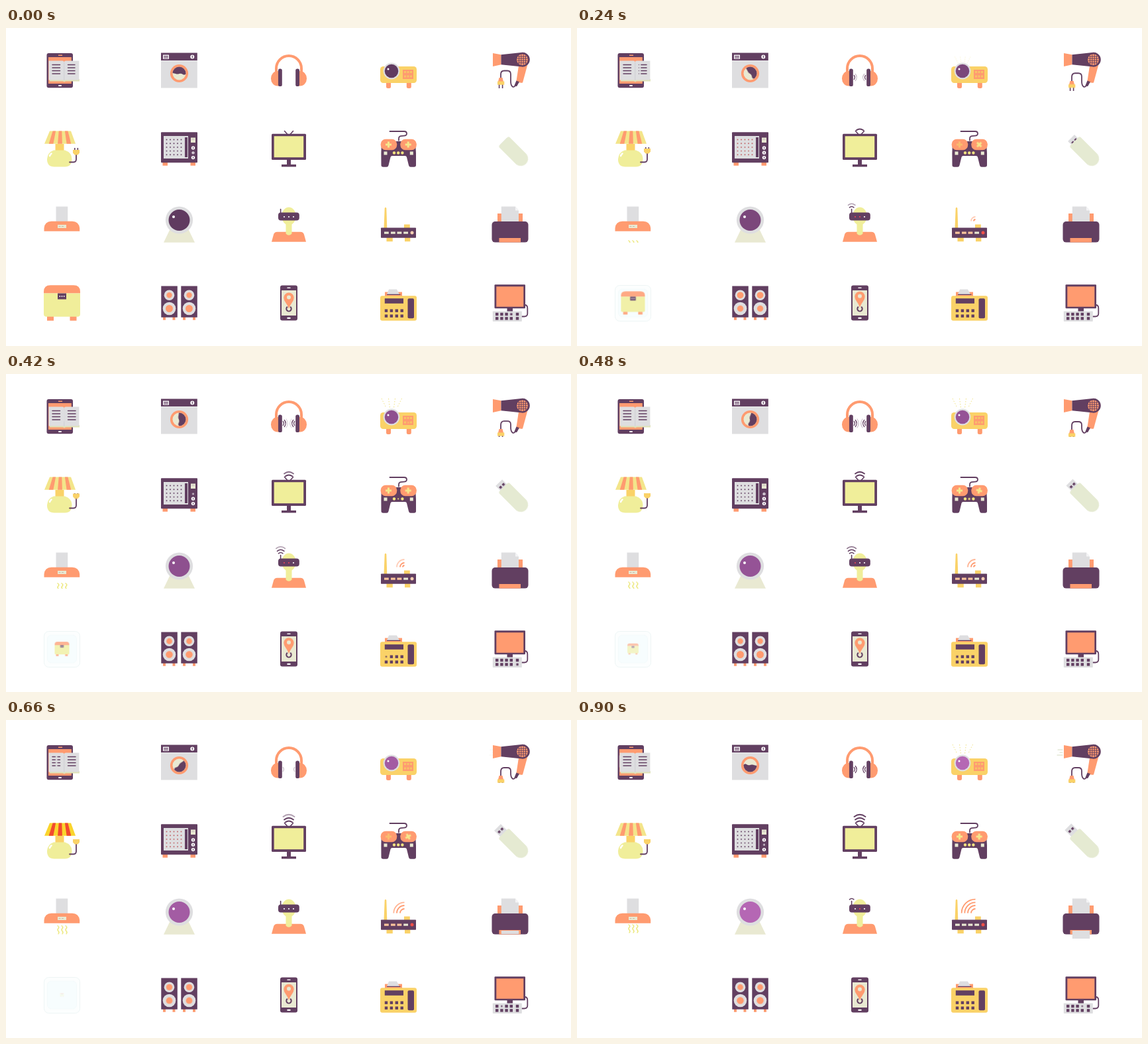
Recreate the animation shown at these times as an HTML page. Size 853x480 px, loop 960 ms.

```html
<!DOCTYPE html>
<html lang="en">
<head>
<meta charset="utf-8">
<title>Household devices</title>
<style>
html, body { margin: 0; width: 100%; height: 100%; overflow: hidden; background: #fff; }
svg { display: block; width: 853px; height: 480px; }

/* palette */
.p { fill: #623f61; } .o { fill: #ff9b70; } .l { fill: #f0ee9a; } .y { fill: #fad268; }
.g { fill: #dedee0; } .b { fill: #e9e9d2; } .w { fill: #fff; }
.line { fill: none; stroke: #623f61; stroke-width: 1.8; stroke-linecap: round; stroke-linejoin: round; }

/* every move advances in ticks of 60 ms, 16 ticks (6.25% each) per loop */
.a { animation: .96s steps(16) infinite; animation-delay: calc(var(--d, 0) * -60ms); }
.mid { transform-box: fill-box; transform-origin: center; }

.page { animation-name: page; }
@keyframes page { to { transform: translateX(-43px); } }

.wash { animation-name: wash; transform-origin: 261.5px 68.5px; }
@keyframes wash { to { transform: rotate(192deg); } }

.ear1 { animation-name: ear1; } .ear2 { animation-name: ear2; } .ear3 { animation-name: ear3; }
@keyframes ear1 {
  0% { opacity: 0; animation-timing-function: steps(3); }
  18.75%, 56.25% { opacity: 1; animation-timing-function: steps(1); }
  62.5% { opacity: 0; animation-timing-function: steps(3); }
  81.25%, 100% { opacity: 1; }
}
@keyframes ear2 {
  0%, 18.75% { opacity: 0; animation-timing-function: steps(3); }
  37.5%, 56.25% { opacity: 1; animation-timing-function: steps(1); }
  62.5%, 81.25% { opacity: 0; animation-timing-function: steps(2); }
  93.75%, 100% { opacity: 1; }
}
@keyframes ear3 {
  0%, 31.25% { opacity: 0; animation-timing-function: steps(4); }
  56.25% { opacity: .9; animation-timing-function: steps(1); }
  62.5%, 100% { opacity: 0; }
}

.lens { animation-name: lens; fill: #603b60; }
@keyframes lens {
  0% { fill: #603b60; animation-timing-function: steps(8); }
  50% { fill: #955396; animation-timing-function: steps(8); }
  100% { fill: #ba6ab8; }
}
.rays { animation-name: rays; transform-origin: 582px 65px; }
@keyframes rays {
  0% { transform: scale(.45); opacity: 0; animation-timing-function: steps(7); }
  43.75%, 56.25% { transform: none; opacity: 1; animation-timing-function: steps(1); }
  62.5% { transform: scale(.45); opacity: 0; animation-timing-function: steps(5); }
  93.75%, 100% { transform: none; opacity: 1; }
}

.cord { animation-name: cord; }
@keyframes cord {
  0% { d: path("M747 76V70Q747 64.500 752 64.500H757Q762 64.500 762 70V80C762 88 766 92 769.500 86"); animation-timing-function: steps(8); }
  50%, 100% { d: path("M747 85V78Q747 72 752 72H757Q762 72 762 77V80C762 88 766 92 769.500 86"); }
}
.plug { animation-name: plug; }
@keyframes plug { 0% { transform: none; animation-timing-function: steps(8); } 50%, 100% { transform: translateY(9px); } }
.air { animation-name: air; }
@keyframes air {
  0%, 62.5% { transform: translateX(6px); opacity: 0; animation-timing-function: steps(5); }
  93.75%, 100% { transform: none; opacity: 1; }
}

.lampcord { animation-name: lampcord; }
@keyframes lampcord {
  0% { d: path("M96 202.500H102Q106 202.500 106 198V190"); animation-timing-function: steps(8); }
  50%, 100% { d: path("M96 202.500H102Q106 202.500 106 198V186"); }
}
.lampplug { animation-name: lampplug; }
@keyframes lampplug { 0% { transform: none; animation-timing-function: steps(8); } 50%, 100% { transform: translateY(-4px); } }
.shade { animation-name: shade; } .stripe { animation-name: stripe; }
@keyframes shade { 0%, 87.5%, 100% { fill: #f3e58a; animation-timing-function: steps(1); } 56.25% { fill: #fad52d; animation-timing-function: steps(1); } }
@keyframes stripe { 0%, 87.5%, 100% { fill: #ff9b70; animation-timing-function: steps(1); } 56.25% { fill: #f24a30; animation-timing-function: steps(1); } }

.heat { animation-name: heat; }
@keyframes heat {
  0%, 37.5%, 93.75%, 100% { stroke: #623f61; animation-timing-function: steps(1); }
  6.25%, 68.75% { stroke: #c06468; animation-timing-function: steps(1); }
}
.press { animation-name: press; }
@keyframes press {
  0% { transform: none; animation-timing-function: steps(2); }
  12.5% { transform: scale(.5); animation-timing-function: steps(2); }
  25%, 100% { transform: none; }
}

.tv1 { animation-name: tv1; } .tv2 { animation-name: tv2; } .tv3 { animation-name: tv3; }
@keyframes tv1 { 0% { opacity: 0; animation-timing-function: steps(4); } 25%, 100% { opacity: 1; } }
@keyframes tv2 { 0%, 25% { opacity: 0; animation-timing-function: steps(4); } 50%, 100% { opacity: 1; } }
@keyframes tv3 { 0%, 50% { opacity: 0; animation-timing-function: steps(6); } 87.5%, 100% { opacity: 1; } }

.dim { animation-name: dim; }
@keyframes dim {
  0%, 37.5%, 75%, 100% { stroke: #f5e88c; animation-timing-function: steps(1); }
  6.25%, 56.25% { stroke: #f9bd6e; animation-timing-function: steps(1); }
}
.spin { animation-name: spin; }
@keyframes spin {
  0% { transform: none; animation-timing-function: steps(4); }
  25% { transform: rotate(45deg); animation-timing-function: steps(3); }
  43.75% { transform: rotate(90deg); animation-timing-function: steps(3); }
  62.5% { transform: rotate(135deg); animation-timing-function: steps(3); }
  81.25%, 100% { transform: rotate(180deg); }
}

.stick { animation-name: stick; }
@keyframes stick {
  0% { transform: translateY(14px); animation-timing-function: steps(4); }
  25% { transform: translateY(7px); animation-timing-function: steps(6); }
  62.5% { transform: translateY(1.5px); animation-timing-function: steps(6); }
  100% { transform: none; }
}

.steam { animation-name: steam; }
@keyframes steam {
  0% { transform: translateY(14px); animation-timing-function: steps(4); }
  25% { transform: translateY(10px); animation-timing-function: steps(6); }
  62.5% { transform: none; animation-timing-function: steps(6); }
  100% { transform: translateY(-2.5px); }
}

.vr1 { animation-name: vr1; } .vr2 { animation-name: vr2; } .vr3 { animation-name: vr3; }
@keyframes vr1 {
  0% { opacity: 0; animation-timing-function: steps(2); }
  12.5%, 62.5% { opacity: 1; animation-timing-function: steps(1); }
  68.75% { opacity: 0; animation-timing-function: steps(4); }
  93.75%, 100% { opacity: 1; }
}
@keyframes vr2 {
  0%, 12.5% { opacity: 0; animation-timing-function: steps(4); }
  37.5%, 62.5% { opacity: 1; animation-timing-function: steps(1); }
  68.75%, 100% { opacity: 0; }
}
@keyframes vr3 {
  0%, 31.25% { opacity: 0; animation-timing-function: steps(4); }
  56.25%, 62.5% { opacity: 1; animation-timing-function: steps(1); }
  68.75%, 100% { opacity: 0; }
}
.led { animation-name: led; fill: #fff; }
@keyframes led {
  0%, 50%, 100% { fill: #fff; animation-timing-function: steps(1); }
  12.5%, 93.75% { fill: #e8465a; animation-timing-function: steps(1); }
}

.net0 { animation-name: net0; } .net1 { animation-name: net1; } .net2 { animation-name: net2; }
.net3 { animation-name: net3; } .net4 { animation-name: net4; }
@keyframes net0 { 0% { opacity: 0; animation-timing-function: steps(2); } 12.5%, 50% { opacity: 1; animation-timing-function: steps(3); } 68.75%, 100% { opacity: 0; } }
@keyframes net1 { 0%, 12.5% { opacity: 0; animation-timing-function: steps(4); } 37.5%, 100% { opacity: 1; } }
@keyframes net2 { 0%, 31.25% { opacity: 0; animation-timing-function: steps(4); } 56.25%, 100% { opacity: 1; } }
@keyframes net3 { 0%, 50% { opacity: 0; animation-timing-function: steps(4); } 75%, 100% { opacity: 1; } }
@keyframes net4 { 0%, 68.75% { opacity: 0; animation-timing-function: steps(4); } 93.75%, 100% { opacity: 1; } }
.power { animation-name: power; }
@keyframes power {
  0%, 37.5%, 75%, 100% { fill: #f8d0b4; animation-timing-function: steps(1); }
  6.25%, 56.25%, 87.5% { fill: #f0504a; animation-timing-function: steps(1); }
}
.port { animation-name: port; }
@keyframes port {
  0%, 75%, 100% { fill: #e9e9d2; animation-timing-function: steps(1); }
  18.75% { fill: #fbc59c; animation-timing-function: steps(1); }
}

.sheet { animation-name: sheet; }
@keyframes sheet { 0%, 50% { transform: translateY(-12.5px); animation-timing-function: steps(7); } 93.75%, 100% { transform: none; } }

.box { animation-name: box; transform-origin: 84.5px 415px; }
@keyframes box {
  0% { transform: none; opacity: 1; animation-timing-function: steps(7); }
  43.75% { transform: scale(.4); opacity: .75; animation-timing-function: steps(3); }
  62.5% { transform: scale(.12); opacity: .2; animation-timing-function: steps(3); }
  81.25% { transform: scale(.08); opacity: .08; animation-timing-function: steps(1); }
  87.5%, 100% { transform: scale(0); opacity: 0; }
}
.halo { animation-name: halo; }
@keyframes halo {
  0% { opacity: 0; animation-timing-function: steps(4); }
  25%, 81.25% { opacity: 1; animation-timing-function: steps(1); }
  87.5%, 100% { opacity: 0; }
}

.beat { animation-name: beat; }
@keyframes beat {
  0%, 50%, 100% { transform: none; animation-timing-function: steps(4); }
  25%, 75% { transform: scale(.86); animation-timing-function: steps(4); }
}
.bob { animation-name: bob; }
@keyframes bob {
  0%, 100% { transform: translateY(1px); animation-timing-function: steps(4); }
  25% { transform: translateY(-.8px); animation-timing-function: steps(6); }
  62.5% { transform: none; animation-timing-function: steps(6); }
}
.key { width: 4.4px; height: 4.4px; }
</style>
</head>
<body>
<svg viewBox="0 0 853 480">
<defs>
  <clipPath id="drum"><circle cx="261.5" cy="68.5" r="10"/></clipPath>
  <clipPath id="socket"><path d="M735 60h30v34.500h-30z"/></clipPath>
  <clipPath id="outlet"><path d="M95 180h20v30H95z"/></clipPath>
  <clipPath id="stove"><path d="M70 306h30v17.500H70z"/></clipPath>
  <clipPath id="slot"><path d="M740 318h40v20h-40z"/></clipPath>
</defs>

<!-- tablet with book -->
<rect class="p" x="61.500" y="38" width="39.500" height="52.200" rx="3"/>
<path class="o" d="M64 44h34.800v40H64zM79 40.500h6v1.400h-6z"/>
<rect class="w" x="79" y="86" width="5" height="2" rx="1"/>
<path fill="#dfe3b8" d="M66 77h45v3.500H90l-2 1-2-1H66z"/>
<path class="g" d="M64.500 49.500H85q2.500 0 2.700 2 .2-2 2.700-2h20V78.500H90q-2 0-2.300 1-.3-1-2.300-1H64.500z"/>
<path class="line" style="stroke-width:1.500" d="M70 55.500h11.500M70 60h11.500M70 64.500h11.500M70 69h11.500M93.500 55.500H105M93.500 60H105M93.500 64.500H105M93.500 69H105"/>
<path stroke="#c8c8cc" stroke-width=".6" d="M87.700 52v27"/>
<path class="g a page" d="M104.500 53.500h2.600v18h-2.600z"/>

<!-- washing machine -->
<path class="g" d="M234 49.500h54.800v41H234z"/>
<path class="p" d="M234 37.500h54.800v11.600H234z"/>
<path class="w" d="M237 40.500h9v6.300h-9z"/>
<path class="line" style="stroke-width:.9" d="M238.500 42.300h6M238.500 43.800h6M238.500 45.300h6"/>
<circle class="w" cx="281.300" cy="43.400" r="3"/>
<path class="line" style="stroke-width:1.200" d="M281.300 42v2.800"/>
<circle class="o" cx="261.500" cy="68.500" r="13.600"/>
<circle class="b" cx="261.500" cy="68.500" r="10"/>
<g clip-path="url(#drum)"><path class="p a wash" d="M250 57h23v11q-3 4-6 2t-5.500-1-5.500 0-6-1z"/></g>

<!-- headphones -->
<path fill="none" stroke="#ff9b70" stroke-width="4" d="M408 68V61a19 19 0 0 1 38 0v7"/>
<path class="o" d="M412 65h-2a10 11.200 0 0 0 0 22.500h2zM442 65h2a10 11.200 0 0 1 0 22.500h-2z"/>
<rect class="p" x="411" y="61.500" width="5.800" height="26.500" rx="2.600"/>
<rect class="p" x="437.200" y="61.500" width="5.800" height="26.500" rx="2.600"/>
<g class="line" style="stroke-width:1.300">
  <path class="a ear1" d="M418.300 71.500q2.200 3 0 6M435.700 71.500q-2.200 3 0 6"/>
  <path class="a ear2" d="M420.300 69.500q4 5 0 10M433.700 69.500q-4 5 0 10"/>
  <path class="a ear3" stroke="#b9a8ba" d="M423 68q4.500 6.500 0 13M431 68q-4.500 6.500 0 13"/>
</g>

<!-- projector -->
<g class="a rays" fill="none" stroke="#efe07c" stroke-width="1" stroke-dasharray="1.500 2.500">
  <path d="M567 37l7 14M577.500 37l2 14M587.500 37l-2 14M597.500 37l-7 14"/>
</g>
<rect class="o" x="574" y="78" width="7" height="13" rx="2.500"/>
<rect class="o" x="604.800" y="78" width="7" height="13" rx="2.500"/>
<rect class="y" x="565" y="58" width="55" height="25" rx="4.500"/>
<circle class="g" cx="582" cy="65" r="12.400"/>
<circle class="a lens" cx="582" cy="65" r="10.300"/>
<circle class="w" cx="577" cy="62" r="1.500"/>
<rect class="o" x="599" y="63" width="16" height="14"/>
<g fill="#f7c465">
  <rect class="a mid press" x="601" y="65" width="3" height="3"/>
  <rect x="605.500" y="65" width="3" height="3"/>
  <rect class="a mid press" style="--d:9" x="610" y="65" width="3" height="3"/>
  <rect x="601" y="71.500" width="3" height="3"/>
  <rect class="a mid press" style="--d:12" x="605.500" y="71.500" width="3" height="3"/>
  <rect x="610" y="71.500" width="3" height="3"/>
</g>

<!-- hair dryer -->
<path class="a air line" style="stroke:#d5dcc0;stroke-width:1.200" d="M726 45h7M729 49h4M725 53h8"/>
<path class="o" d="M735 38l12.500 2.200v15L735 58z"/>
<path class="o" d="M774 57l13.500-2L780 82.500q-5.500 1-9.500-2.500z"/>
<path class="p" d="M747.500 40.200L778 37a10.900 10.900 0 1 1 1 21.600L747.500 55.200z"/>
<circle class="o" cx="779.500" cy="47.800" r="8.400"/>
<path class="line" style="stroke-width:.9" d="M774.500 42v11.500M777.800 40v15.500M781.200 40v15.500M784.500 42v11.500M773.500 43h12M772 46.200h15M772 49.400h15M773.500 52.600h12"/>
<path class="p" d="M770.500 79.500l4.500 1.800-4 7-3.500-1.500z"/>
<path class="a line cord" d="M747 76V70Q747 64.500 752 64.500H757Q762 64.500 762 70V80C762 88 766 92 769.500 86"/>
<g clip-path="url(#socket)"><g class="a plug">
  <path class="p" d="M743.800 85h1.600v6h-1.600zM748.800 85h1.600v6h-1.600z"/>
  <path class="o" d="M744.500 75h5l1.500 6h-8z"/>
  <path class="y" d="M742 80.500h10.300v5.200H742z"/>
</g></g>

<!-- lamp -->
<path class="a shade" d="M66 155.500h32l7 19.300H58z"/>
<path class="a stripe" d="M70.600 155.500h4.500l-3.700 19.300h-6.700zM79.700 155.500h4.600l.6 19.300h-6.800zM88.900 155.500h4.500l4.900 19.300h-6.700z"/>
<path class="y" d="M74.500 175h13v11h-13z"/>
<path class="l" d="M72 184.500H89Q99.500 188 99.500 198 99 209.500 89 209.500H73Q62 209.500 62 198 62.500 188 72 184.500z"/>
<path class="line" style="stroke:#fff;stroke-width:2.600" d="M66 193q.8-2.200 2.500-3.500"/>
<path class="a line lampcord" d="M96 202.500H102Q106 202.500 106 198V190"/>
<g clip-path="url(#outlet)"><g class="a lampplug">
  <path class="p" d="M103 181h1.600v4H103zM107.500 181h1.600v4h-1.600z"/>
  <path class="y" d="M101 184h10v4.500l-2.500 3h-5l-2.500-3z"/>
</g></g>

<!-- microwave -->
<path class="o" d="M236.500 202h7.500v5.800h-7.500zM278.500 202h7.500v5.800h-7.500z"/>
<rect class="p" x="234" y="157.200" width="55" height="46" rx="1"/>
<path class="g" d="M238 163h37v34h-37z"/>
<path class="p" d="M270 165h4v30h-4z"/>
<path class="a heat" fill="none" stroke="#623f61" stroke-width="1.900" stroke-linecap="round" stroke-dasharray="0 5.500" d="M242.500 168.500h23M242.500 174.200h23M242.500 179.900h23M242.500 185.600h23M242.500 191.300h23"/>
<path class="b" d="M279 165.500h7v7.500h-7z"/>
<path class="line" style="stroke:#b9aab9;stroke-width:.8" d="M280.500 168h4"/>
<g class="a mid press" style="--d:11"><circle class="w" cx="282.500" cy="181" r="2.700"/><path class="line" style="stroke-width:1" d="M282.500 180v2"/></g>
<g class="a mid press" style="--d:3"><circle class="w" cx="282.500" cy="188.300" r="2.700"/><path class="line" style="stroke-width:1" d="M282.500 187.300v2"/></g>
<circle class="w" cx="282.500" cy="195.600" r="2.700"/><path class="line" style="stroke-width:1" d="M282.500 194.600v2"/>

<!-- television -->
<g class="line">
  <path style="stroke-width:1.600" d="M424.500 160l-4-4.500M429.500 160l4-4.500"/>
  <path class="a tv1" d="M421.500 154.500q5.500-4 11 0"/>
  <path class="a tv2" d="M420 150.500q7-5.500 14 0"/>
  <path class="a tv3" d="M418.500 146q8.500-6.500 17 0"/>
</g>
<rect class="p" x="401" y="159.700" width="52" height="39.300" rx="1.500"/>
<path class="l" d="M404.700 163.200h44.500v32h-44.500z"/>
<path class="p" d="M424 198h6v8h8v3.500h-22V206h8z"/>

<!-- gamepad -->
<path class="line" d="M579.500 156H601q4 0 4 3.500 0 2.800-4 3.200l-5 .5q-3 .5-3 3.500v3"/>
<path class="p" d="M568 171h50q1.500 18 1 36 0 2.800-3 2.800h-5q-2.500 0-3-2.500l-3-12.300q-.5-2-2.500-2h-19.500q-2 0-2.500 2l-3 12.300q-.5 2.500-3 2.500h-5q-3 0-3-2.800-.5-18 .5-36z"/>
<rect class="o" x="565.700" y="167.800" width="24.500" height="16.400" rx="7.500"/>
<rect class="o" x="595.300" y="167.800" width="24.500" height="16.400" rx="7.500"/>
<g fill="none" stroke="#f5e88c" stroke-width="3">
  <path class="a dim" d="M573 176h9M577.500 171.500v9"/>
  <path class="a mid spin" d="M602.700 176h9M607.200 171.500v9"/>
</g>
<path class="b" d="M570.500 186.500h5v5h-5zM609.800 186.500h5v5h-5z"/>
<g fill="#f3e482">
  <circle class="a mid press" cx="586" cy="188.500" r="2.200"/>
  <circle class="a mid press" style="--d:11" cx="592.200" cy="188.500" r="2.200"/>
  <circle class="a mid press" style="--d:5" cx="598.400" cy="188.500" r="2.200"/>
</g>

<!-- memory stick -->
<g transform="translate(751 171) rotate(-45)">
  <g class="a stick"><path class="g" d="M-7-14H7V2H-7z"/><path class="p" d="M-4.800-9h3.600v3.600h-3.600zM1.200-9h3.600v3.600H1.200z"/></g>
  <path fill="#e5ead2" d="M-8 0H8q3 0 3 3V37a11 11 0 0 1-22 0V3q0-3 3-3z"/>
</g>

<!-- extractor hood -->
<path class="g" d="M75.500 269.500h17.700V293H75.500z"/>
<g clip-path="url(#stove)"><path class="a line steam" style="stroke:#ece779;stroke-width:1.500" d="M78 311q3 2 1 4t0 4 0 4M84 311q3 2 1 4t0 4 0 4M90 311q3 2 1 4t0 4 0 4"/></g>
<path class="o" d="M57.500 306.800V302q1-10 11-10.300H100q10 .3 11.200 10.300v4.800z"/>
<path class="b" d="M78 297h13v5H78z"/>
<path class="line" style="stroke:#c9b7a8;stroke-width:1;stroke-dasharray:2 2.500" d="M80 299.500h9"/>

<!-- webcam -->
<path class="b" d="M248 303h27l10 20.800h-47z"/>
<circle class="g" cx="261.500" cy="290" r="20.600"/>
<circle class="a lens" cx="261.500" cy="290" r="16"/>
<circle class="w" cx="253" cy="285" r="2"/>

<!-- headset wearer -->
<path class="o" d="M401 322.800l3-11q1.200-4 5.500-4h35q4.300 0 5.500 4l3 11z"/>
<path class="l" d="M422.500 293h9v17.500q-4.500 4.500-9 0z"/>
<ellipse class="l" cx="427" cy="284" rx="10.800" ry="13.500"/>
<rect class="p" x="411" y="278.500" width="31.800" height="12" rx="4"/>
<g class="line" style="stroke-width:1.600">
  <path d="M414.600 273.500v6"/>
  <path class="a vr1" d="M411.500 270.800q3.200-2.600 6.400 0"/>
  <path class="a vr2" d="M409.500 267.300q5.200-4 10.400 0"/>
  <path class="a vr3" d="M407.800 263.300q6.800-5 13.600 0"/>
</g>
<circle class="a led" style="--d:14" cx="420" cy="285" r="1.100"/>
<circle class="a led" cx="427" cy="285" r="1.100"/>
<circle class="w" cx="434" cy="285" r="1.100"/>

<!-- router -->
<path class="y" d="M571.700 272q1.300-2.500 2.600 0l1 30h-4.800zM601 296.500h8.800v6H601zM574.500 316h9.300v6.300h-9.300zM602 316h8.300v6.300H602z"/>
<rect class="p" x="566" y="301.500" width="53" height="15.200" rx=".8"/>
<path class="a port" d="M571 307.500h6.800v3.200H571zM581 307.500h6.800v3.200H581zM590.500 307.500h6.800v3.200h-6.800z"/>
<path class="b" d="M600.200 307.500h6.800v3.200h-6.800z"/>
<circle class="a power" cx="613" cy="309" r="2.500"/>
<g fill="none" stroke="#ff9b70" stroke-width="1.800">
  <path class="a net0" d="M599 291.500a2.500 2.500 0 0 1 2.500-2.500"/>
  <path class="a net1" d="M595 291.500a6.500 6.500 0 0 1 6.500-6.500"/>
  <path class="a net2" d="M590 291.500a11.500 11.500 0 0 1 11.500-11.500"/>
  <path class="a net3" d="M585.300 291.500a16.200 16.200 0 0 1 16.200-16.200"/>
  <path class="a net4" d="M580.600 291.500a20.900 20.900 0 0 1 20.900-20.900"/>
</g>

<!-- printer -->
<path class="o" d="M742 280h38v14h-38z"/>
<path class="g" d="M747.800 269.500H769l5 6V294h-26.200z"/>
<path fill="#f4f4f5" d="M769 269.500l5 6h-5z"/>
<rect class="p" x="733.500" y="292" width="55" height="31.600" rx="5"/>
<path class="o" d="M744.500 317h32.500v6.600h-32.500z"/>
<g clip-path="url(#slot)"><path class="g a sheet" d="M747.800 318h26.400v12h-26.400z"/></g>

<!-- chest -->
<g class="a halo" fill="#fcfefe" stroke="#eaf3f3" stroke-width=".8">
  <rect x="57.500" y="388.500" width="54" height="54" rx="7"/>
  <rect fill="#f7fdfe" stroke="#f1f9fa" x="62.500" y="394" width="44" height="42" rx="6"/>
</g>
<g class="a box">
  <path class="o" d="M62 433h10v8.800H62zM96.500 433h10v8.800h-10zM57 400.500V398q0-9.700 10-9.700h35q10 0 10 9.700v2.500z"/>
  <path class="l" d="M57 400.500h55V432q0 3.700-4 3.700H61q-4 0-4-3.700z"/>
  <path class="p" d="M78 400.500h13v9H78z"/>
  <path class="line" style="stroke:#fff;stroke-dasharray:0 3.200" d="M81.300 405h7"/>
</g>

<!-- loudspeakers -->
<path class="o" d="M237 436h4v4.800h-4zM251.500 436h4v4.800h-4zM267 436h4v4.800h-4zM282 436h4v4.800h-4z"/>
<path class="p" d="M234.300 389.500h24.500v47.300h-24.500zM264.300 389.500h24.500v47.300h-24.500z"/>
<g class="g"><circle cx="246.500" cy="403.300" r="7.800"/><circle cx="276.500" cy="403.300" r="7.800"/><circle cx="246.500" cy="423.500" r="9.800"/><circle cx="276.500" cy="423.500" r="9.800"/></g>
<g class="o">
  <circle class="a mid beat" style="--d:4" cx="246.500" cy="403.300" r="4.900"/>
  <circle class="a mid beat" style="--d:4" cx="276.500" cy="403.300" r="4.900"/>
  <circle class="a mid beat" cx="246.500" cy="423.500" r="5.500"/>
  <circle class="a mid beat" cx="276.500" cy="423.500" r="5.500"/>
</g>

<!-- phone -->
<rect class="p" x="414" y="388.500" width="26" height="53" rx="3"/>
<path class="b" d="M416 396h22v38h-22z"/>
<rect class="w" x="424.500" y="391.500" width="5" height="1.400"/>
<rect class="w" x="424.300" y="436.700" width="5.400" height="2.300" rx="1.100"/>
<path class="line" style="stroke-width:2" d="M424.300 421.300a3.700 3.700 0 1 0 5.400 0"/>
<g class="a bob">
  <path class="o" d="M427 422.500q-1.500-4.500-4.500-8.500-3.200-4-3.200-8a7.700 7.500 0 0 1 15.400 0q0 4-3.200 8-3 4-4.500 8.500z"/>
  <circle class="b" cx="427" cy="405.500" r="3"/>
</g>

<!-- fax -->
<path class="o" d="M572 398.500h26v7h-26z"/>
<path class="g" d="M578 394.500h12l4 7.500h-19z"/>
<path class="line" style="stroke-width:1.300" d="M575.500 402.300h19.500"/>
<rect class="y" x="565" y="404.300" width="55" height="37.500" rx="3"/>
<path class="p" d="M571.800 408.200H600v7.600h-28.200z"/>
<rect class="p" x="606.500" y="408.200" width="9.500" height="30" rx="2"/>
<g class="p">
  <rect class="key a mid press" style="--d:11" x="571.800" y="424.500"/>
  <rect class="key" x="579.700" y="424.500"/>
  <rect class="key" x="587.600" y="424.500"/>
  <rect class="key a mid press" style="--d:5" x="595.500" y="424.500"/>
  <rect class="key" x="571.800" y="432.500"/>
  <rect class="key" x="579.700" y="432.500"/>
  <rect class="key a mid press" style="--d:0" x="587.600" y="432.500"/>
  <rect class="key" x="595.500" y="432.500"/>
</g>

<!-- computer -->
<path class="line" d="M779 435.500h3.500q4.800 0 4.800-4.500v-8q0-5-4.500-5"/>
<rect class="p" x="737.500" y="387.300" width="46.500" height="36" rx="1.200"/>
<path class="o" d="M740.300 390.300h41v30.400h-41z"/>
<path class="p" d="M756.500 423h8.500v5h-8.500z"/>
<rect class="g" x="734.800" y="427.500" width="44" height="15.500" rx=".8"/>
<g class="p">
  <rect class="key" x="739" y="429.800"/>
  <rect class="key a mid press" style="--d:7" x="746.200" y="429.800"/>
  <rect class="key" x="753.400" y="429.800"/>
  <rect class="key a mid press" style="--d:3" x="760.600" y="429.800"/>
  <rect class="key" x="769.800" y="429.800"/>
  <rect class="key" x="739" y="436.200"/>
  <rect class="key" x="746.200" y="436.200"/>
  <rect class="key a mid press" x="753.400" y="436.200"/>
  <rect class="key" x="760.600" y="436.200"/>
  <rect class="key a mid press" style="--d:12" x="769.800" y="436.200"/>
</g>
</svg>
</body>
</html>
```
